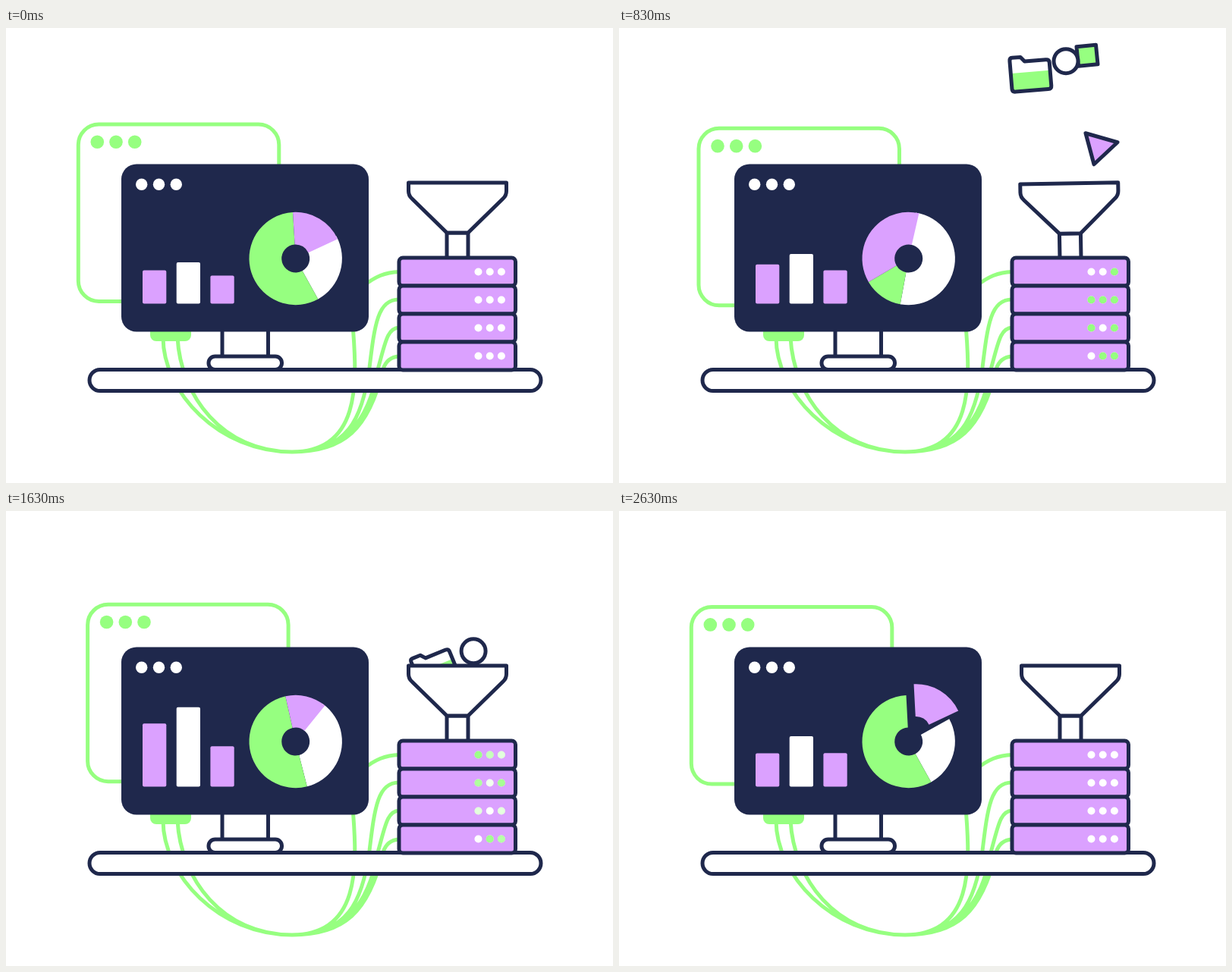
An HTML page with a canvas that plays this animation: 800 by 600 pixels, repeating every 2660 ms.

```html
<!DOCTYPE html>
<html lang="en">
<head>
<meta charset="utf-8">
<title>Data funnel</title>
<style>
  html, body { margin: 0; width: 100%; height: 100%; overflow: hidden; background: #fff; }
  canvas { display: block; width: 800px; height: 600px; }
</style>
</head>
<body>
<canvas id="stage" width="800" height="600"></canvas>
<script>
const ctx = document.getElementById('stage').getContext('2d');
const LOOP = 2660;
const NAVY = '#1f284c', GREEN = '#96ff80', PURPLE = '#dba1ff', WHITE = '#fff';

const clamp = u => Math.min(1, Math.max(0, u));
const smooth = u => u * u * (3 - 2 * u);
// Half a sine wave between two times, and the same with soft ends
const arch = (t, from, to) => Math.sin(Math.PI * clamp((t - from) / (to - from)));
const hump = (t, from, to) => arch(t, from, to) ** 2;
const random = seed => { const n = Math.sin(seed * 127.1 + 11.7) * 43758.5453; return n - Math.floor(n); };

function shape(path, fill, stroke) {
  if (fill) { ctx.fillStyle = fill; ctx.fill(path); }
  if (stroke) { ctx.strokeStyle = stroke; ctx.stroke(path); }
}

function box(x, y, w, h, r, fill, stroke) {
  const path = new Path2D();
  path.roundRect(x, y, w, h, r);
  shape(path, fill, stroke);
}

function dot(x, y, r, fill, stroke) {
  const path = new Path2D();
  path.arc(x, y, r, 0, 2 * Math.PI);
  shape(path, fill, stroke);
}

function place(x, y, degrees, draw) {
  ctx.save();
  ctx.translate(x, y);
  ctx.rotate(degrees * Math.PI / 180);
  draw();
  ctx.restore();
}

const cables = new Path2D(`
  M207 408 C207 480 280 559 377 559
  M226 408 C230 485 285 559 377 559
  M518 321.5 C500 322 486 328 470 341
  M457.5 398 C463 470 466 559 377 559
  M518 358 C490 358 486 390 479 448 C470 515 450 559 377 559
  M518 395 C502 396 500 415 490 450 C478 520 445 559 377 559
  M518 433 Q502 434 497 450 C478 530 445 559 377 559`);
const funnelBody = new Path2D(
  'M530.5 204 H659.5 V215 Q659.5 221 655 225 L609 270 H581 L535 225 Q530.5 221 530.5 215 Z');

const diamond = new Path2D('M-11 -23 H5 L28 0 L4 25 L-26 -3 V-6 Z');
const facet = new Path2D('M-11 -22 H5 L-4 -14 Z');
const triangle = new Path2D('M-19 -18 L23 -6 L-8 23 Z');
const square = new Path2D('M-14 -11.5 L11.5 -14 L14 11.5 L-11.5 14 Z');
const folder = new Path2D(
  'M-25.5 -21 Q-25.5 -25 -22 -25 H-11 L-6 -19 H22 Q26.5 -19 26.5 -15 V16 Q26.5 20 22 20 H-21 Q-25.5 20 -25.5 16 Z');
const page = new Path2D('M-14 -24 H4 L17 -12 V24 H-18 V-20 Q-18 -24 -14 -24 Z');
const pageFold = new Path2D('M3.5 -24 V-11.5 H17 Z');

const drawCircle = () => dot(0, 0, 16, WHITE, NAVY);
function drawDiamond() {
  shape(diamond, PURPLE);
  shape(facet, WHITE);
  shape(diamond, null, NAVY);
}
function drawFolder() {
  shape(folder, WHITE);
  ctx.fillStyle = GREEN;
  ctx.fillRect(-25, -4.5, 51, 24);
  shape(folder, null, NAVY);
}
function drawPage() {
  shape(page, PURPLE);
  shape(pageFold, WHITE);
  shape(page, null, NAVY);
}

// Each item drops at its time, lands in the funnel and sinks at its own pace.
const FALL = 1890, START_Y = 28, REST_Y = 183, FAST = 6000;
const items = [
  { draw: drawDiamond, time: 319, x: 562, sink: FAST },
  { draw: () => shape(triangle, PURPLE, NAVY), time: 570, x: 634, sink: FAST },
  { draw: () => shape(square, GREEN, NAVY), time: 765, x: 617, sink: FAST },
  { draw: drawCircle, time: 740, x: 589, drift: 20, sink: 970 },
  { draw: drawPage, time: 860, x: 640, sink: FAST, tilt: 25 },
  { draw: drawFolder, time: 696, x: 542, drift: 29, sink: 96, tilt: -43 },
  { draw: drawCircle, time: 1034, x: 556.3, drift: 281, sink: 60 }
];

function drawItems(t) {
  const landing = Math.sqrt((REST_Y - START_Y) / FALL);
  ctx.save();
  ctx.beginPath();
  ctx.rect(480, 0, 220, 206);
  ctx.clip();
  for (const { draw, time, x, sink, drift = 0, tilt = 0 } of items) {
    const s = (t - time) / 1000;
    if (s <= 0) continue;
    const y = s < landing ? START_Y + FALL * s * s : REST_Y + sink * (s - landing) ** 3;
    place(x + drift * s ** 3, y, tilt * Math.sin(2.5 * s) ** 2, () => {
      const size = clamp(s / .05);
      ctx.scale(size, size);
      draw();
    });
  }
  ctx.restore();
}

function drawFunnel(t) {
  const load = arch(t, 550, 1630);
  const sway = 1.4 * load * Math.sin((t - 550) / 380 * 2 * Math.PI);
  place(595, 303 + 1.2 * load, sway, () => {
    ctx.translate(-595, -303);
    box(581, 270, 28, 34, 0, WHITE, NAVY);
    shape(funnelBody, WHITE, NAVY);
  });
}

function drawWindow(t) {
  const a = t / LOOP * 2 * Math.PI;
  place(102.3 - 7 * Math.cos(a), 127 + 5.8 * Math.sin(a), 0, () => {
    box(0, 0, 264.5, 233.5, 27, WHITE, GREEN);
    for (let i = 0; i < 3; i++) dot(25 + i * 24.7, 23.3, 8.8, GREEN);
  });
}

// Angles run clockwise from the top.
function slice(from, to, color, shift = 0) {
  const rad = d => (d - 90) * Math.PI / 180;
  const x = 381.7 + 24.5 * shift, y = 304 - 35.5 * shift;
  ctx.beginPath();
  ctx.arc(x, y, 61.2, rad(from), rad(to));
  ctx.arc(x, y, 18.5, rad(to), rad(from), true);
  ctx.fillStyle = color;
  ctx.fill();
}

function drawPie(t) {
  const white = 61 + 720 * smooth(clamp(t / 1840));
  const whiteSize = 90 + Math.max(0, Math.min(.11 * t, .34 * (1750 - t)));
  const purpleSize = 64 + 152 * Math.sin(Math.PI * t / 1095) * clamp(1 - t / 1700) ** .7;
  const green = white + whiteSize, purple = white - purpleSize;
  slice(white, green, WHITE);
  slice(green, purple + 360, GREEN);
  slice(purple, white + 4, PURPLE, arch(t, 1800, 2760));
}

// Resting height and the size of three successive swings
const bars = [[44, 10, 58, 0], [54.5, 14, 74, 13], [37, 9, 24, 8]];

function drawMonitor(t) {
  box(285, 395, 60.5, 40, 0, WHITE, NAVY);
  box(267, 433, 96.5, 17.5, 8.5, WHITE, NAVY);
  box(152, 179.5, 326, 221, 20, NAVY);
  bars.forEach(([rest, first, second, third], i) => {
    const height = rest + first * hump(t, 0, 1270) + second * hump(t, 1200, 2600) + third * hump(t, 2550, 2750);
    box(180 + i * 44.7, 363.5 - height, 31.3, height, 2, i === 1 ? WHITE : PURPLE);
    dot(178.7 + i * 22.8, 206.3, 7.7, WHITE);
  });
  drawPie(t);
}

// Two bursts of blinking; chance decides which lights join and when.
function glow(t, light) {
  const flash = (seed, from, to) => {
    const delay = 200 * random(seed);
    return random(seed + 50) < .65 ? clamp(2 * hump(t, from + delay, to + delay)) : 0;
  };
  return Math.max(flash(light, 450, 1150), flash(light + 20, 1350, 2450));
}

function drawServers(t) {
  for (let row = 0; row < 4; row++) {
    box(518, 303 + row * 37, 153.5, 37, 5, PURPLE, NAVY);
    for (let i = 0; i < 3; i++) {
      const x = 622.5 + i * 15.2, y = 321.5 + row * 37;
      dot(x, y, 5, WHITE);
      ctx.globalAlpha = glow(t, row * 3 + i);
      dot(x, y, 5.1, GREEN);
      ctx.globalAlpha = 1;
    }
  }
}

const began = performance.now();

function frame() {
  const t = (performance.now() - began) % LOOP;
  ctx.fillStyle = WHITE;
  ctx.fillRect(0, 0, 800, 600);
  ctx.lineWidth = 5;
  ctx.lineJoin = 'round';
  drawWindow(t);
  shape(cables, null, GREEN);
  box(190, 392, 54, 21, 8, GREEN);
  drawMonitor(t);
  box(110, 450.5, 595, 28, 14, WHITE, NAVY);
  drawItems(t);
  drawFunnel(t);
  drawServers(t);
  requestAnimationFrame(frame);
}

frame();
</script>
</body>
</html>
```
